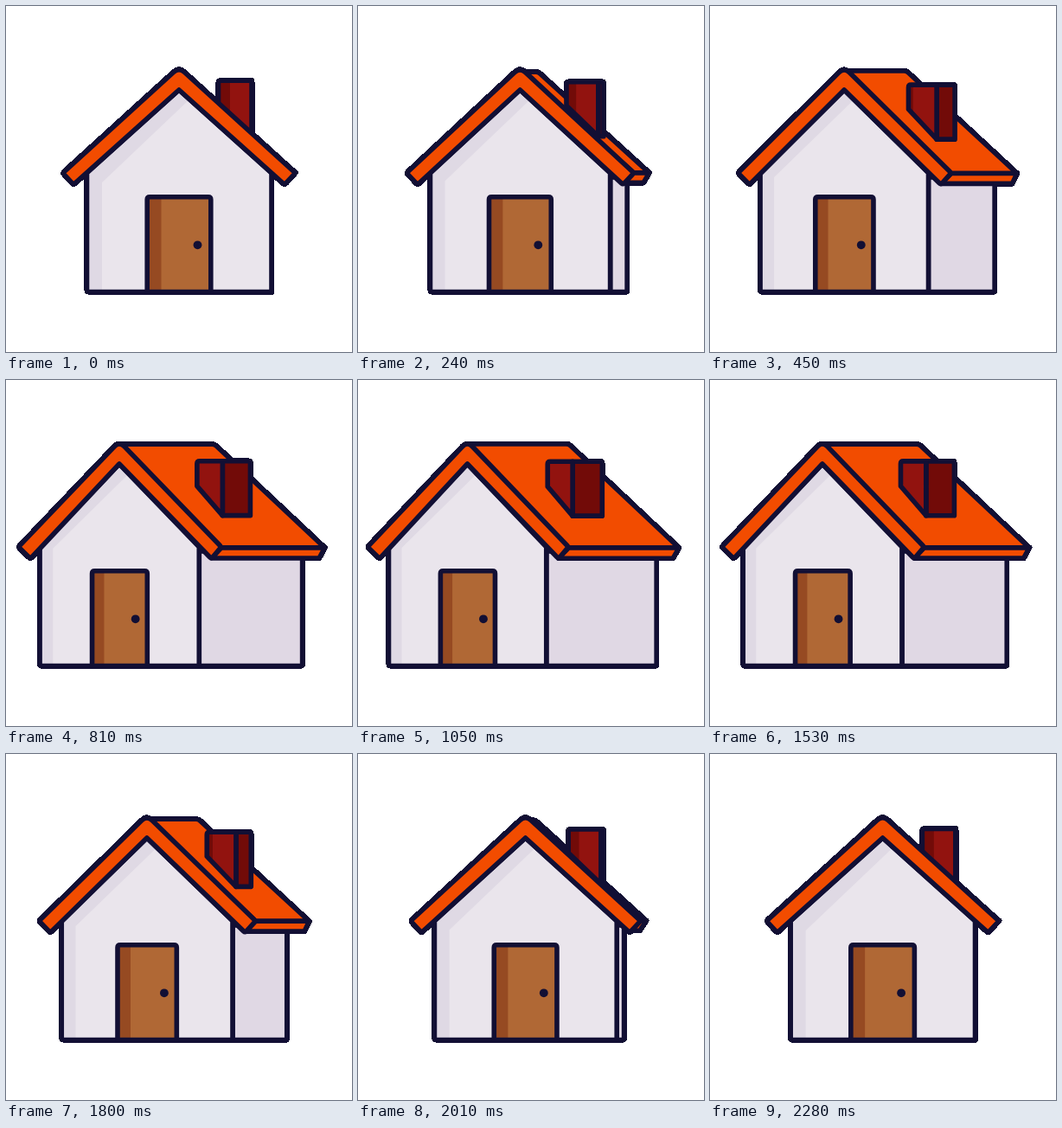
Recreate the animation shown at these times as an HTML page. Size 400 by 400 pixels, loop 4.31 s.

```html
<!DOCTYPE html>
<html lang="en">
<head>
<meta charset="utf-8">
<title>Turning house</title>
<style>
  html, body { margin: 0; width: 100%; height: 100%; overflow: hidden; background: #fff; }
  svg { display: block; width: 100%; height: 100%; }
</style>
</head>
<body>
<svg id="stage" viewBox="0 0 400 400"></svg>
<script>
const LOOP = 4310, HALF = 1200, STEP = 30, LAST = 2280;
const INK = '#120f34', ORANGE = '#f24c00', RED = '#92130f', DARK_RED = '#720b08';
const stage = document.getElementById('stage');

function add(tag, fill, line = 0) {
  const el = document.createElementNS('http://www.w3.org/2000/svg', tag);
  el.setAttribute('fill', fill);
  if (line) {
    el.setAttribute('stroke', INK);
    el.setAttribute('stroke-width', line);
    el.setAttribute('stroke-linejoin', 'round');
  }
  stage.append(el);
  return el;
}

// Back to front; the rim gives the silhouette its hard edge
const LINE = 5.6;
const rim = add('path', INK, 6.5);
const sideWall = add('path', '#e0d8e4', LINE);
const sideRoof = add('path', ORANGE, LINE);
const eave = add('path', ORANGE, LINE);
const stackSide = add('path', DARK_RED, LINE);
const stackFront = add('path', RED);
const stackShade = add('path', DARK_RED);
const stackLine = add('path', 'none', LINE);
const wallShade = add('path', '#dfd9e4');
const wallLight = add('path', '#eae5ec');
const wallLine = add('path', 'none', LINE);
const door = add('path', '#b06835');
const doorShade = add('path', '#964a22');
const doorLine = add('path', 'none', LINE);
const knob = add('circle', INK);
const gable = add('path', ORANGE, LINE);
rim.setAttribute('shape-rendering', 'crispEdges');
knob.setAttribute('r', 4.9);
knob.setAttribute('cy', 276.3);

const draw = (el, d) => el.setAttribute('d', d);
const mix = (a, b, k) => a + (b - a) * k;

// Point on the way from a to b, at distance r from a
function toward(a, b, r) {
  const k = r / (Math.hypot(b[0] - a[0], b[1] - a[1]) || 1);
  return mix(a[0], b[0], k) + ' ' + mix(a[1], b[1], k);
}

// Closed polygon; each point is [x, y, corner radius]
function poly(...pts) {
  const n = pts.length;
  return 'M' + pts.map((q, i) => {
    const [x, y, r] = q;
    if (!r) return x + ' ' + y;
    return toward(q, pts[(i + n - 1) % n], r) + `Q${x} ${y} ` + toward(q, pts[(i + 1) % n], r);
  }).join('L') + 'Z';
}

const box = (x1, y1, x2, y2) => poly([x1, y1], [x2, y1], [x2, y2], [x1, y2]);

// Cubic bezier easing with end handles at heights 0 and 1
function ease(x, x1, x2) {
  let lo = 0, hi = 1;
  for (let i = 0; i < 30; i++) {
    const s = (lo + hi) / 2, r = 1 - s;
    if (3 * s * r * r * x1 + 3 * s * s * r * x2 + s * s * s < x) lo = s; else hi = s;
  }
  return lo * lo * (3 - 2 * lo);
}

function turnAt(t) {
  return t < HALF ? ease(t / HALF, .36, .18) : 1 - ease((t - HALF) / HALF, .84, .16);
}

function render(time) {
  const t = Math.min(LAST, Math.floor((time % LOOP) / STEP) * STEP);
  const p = turnAt(t);
  const at = (a, b) => mix(a, b, p);

  const apex = at(200, 125.8), floor = 330.5;
  const wallL = at(93.5, 35), wallR = at(307, 217);
  const tipL = at(65.6, 10.6), footL = at(78, 24.5);
  const tipR = at(334.6, 242.6), footR = at(322, 231);
  const tipY = 193, footY = 206.6;

  // Side of the house
  const backTip = at(329.5, 371.5), backFoot = 321.5 + 51 * p - 8 * p * p;
  const ridge = at(76.6, 74), eaveTop = at(192.6, 194), eaveLow = at(204, 206.2);
  const sideEnd = at(304, 345.5);
  const side = poly([wallR, 198], [sideEnd, 198], [sideEnd, floor, 2], [wallR, floor]);
  const slope = poly([apex, ridge], [at(201, 244), ridge, 3], [backTip, eaveTop], [tipR, eaveTop]);
  const edgeBand = poly([tipR, eaveTop], [backTip, eaveTop], [backFoot, eaveLow], [footR, eaveLow]);
  draw(sideWall, side);
  draw(sideRoof, slope);
  draw(eave, edgeBand);

  // Chimney
  const left = at(245.5, 219), edge = at(284, 247.8), right = at(284.3, 282.3);
  const top = at(86.3, 94.3), low = at(149.5, 157.2), lowL = at(113.5, 123.3);
  const strip = left + 13.5 * (1 - p);
  const flank = poly([edge, top], [right, top, 2], [right, low], [edge, low]);
  const face = poly([left, lowL], [left, top, 3], [edge, top], [edge, low]);
  draw(stackSide, flank);
  draw(stackFront, face);
  draw(stackShade, poly([left, top, 3], [strip, top],
    [strip, mix(lowL, low, (strip - left) / (edge - left))], [left, lowL]));
  draw(stackLine, face);

  // Front wall
  const front = poly([wallL, floor, 3], [wallL, 193], [apex, 97], [wallR, 193], [wallR, floor, 3]);
  const shadeX = at(111, 50);
  draw(wallShade, front);
  draw(wallLight, poly([shadeX, floor], [shadeX, at(204, 194)], [at(212, 137), 108],
    [wallR, 193], [wallR, floor]));
  draw(wallLine, front);

  // Door
  const doorL = at(163.2, 94.8), doorR = at(236.8, 157.8), doorTop = 220.8;
  const frame = poly([doorL, floor], [doorL, doorTop, 3], [doorR, doorTop, 3], [doorR, floor]);
  draw(door, frame);
  draw(doorShade, box(doorL, doorTop + 1, at(179.5, 108.5), floor));
  draw(doorLine, frame);
  knob.setAttribute('cx', at(221.5, 144.3));

  // Front roof band
  const band = poly([footL, footY, 2.5], [tipL, tipY, 2.5], [apex, 70.8, 8.5],
    [tipR, tipY, 2.5], [footR, footY, 2.5], [apex, 97]);
  draw(gable, band);
  draw(rim, side + slope + edgeBand + flank + face + front + band);
}

const start = performance.now();
function tick() {
  render(performance.now() - start);
  requestAnimationFrame(tick);
}
tick();
</script>
</body>
</html>
```
